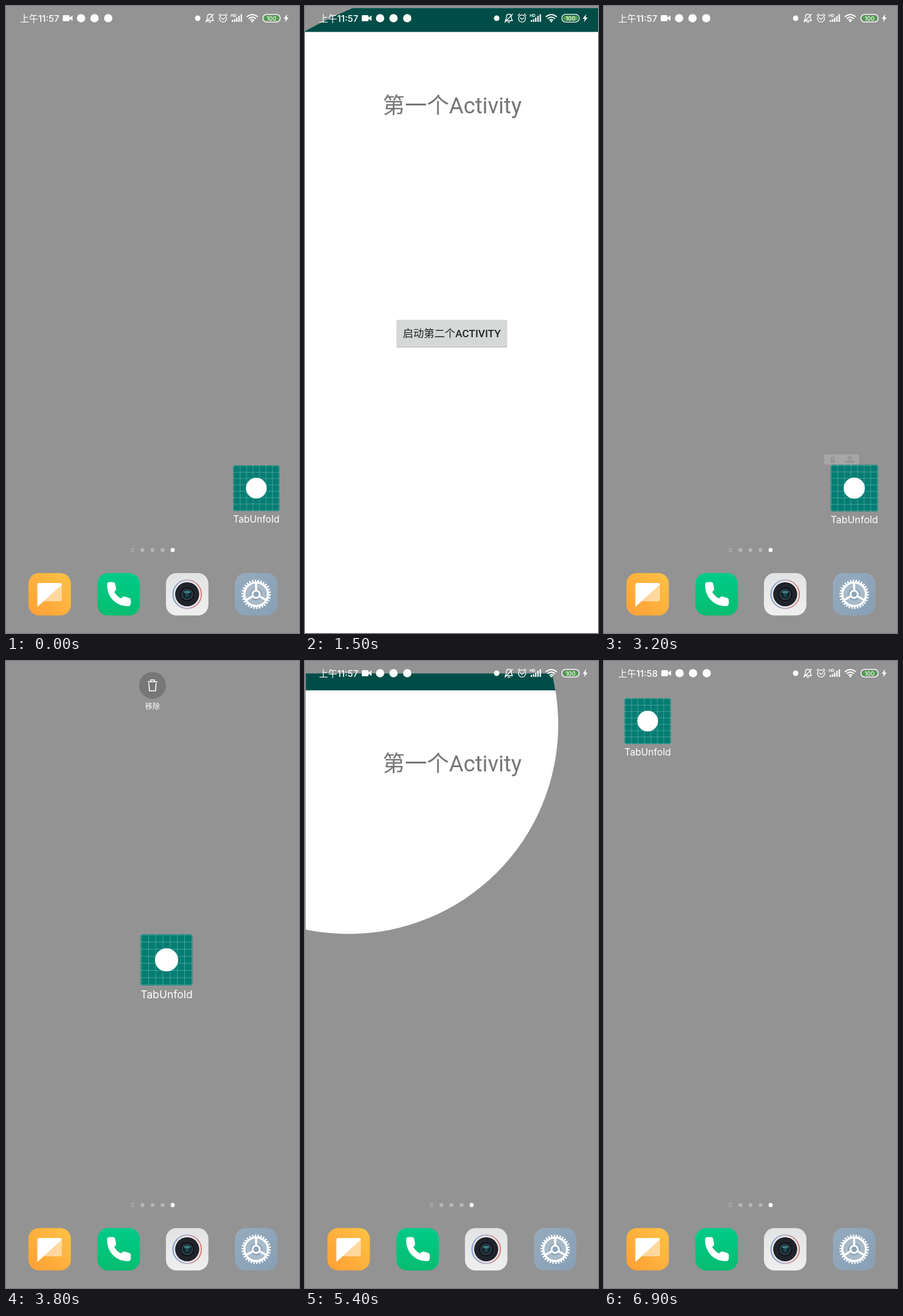
Recreate the animation shown at these times as an HTML page. Size 480 by 1028 pixels, loop 7 s.

```html
<!DOCTYPE html>
<html lang="zh">
<head>
<meta charset="utf-8">
<title>Circular reveal</title>
<style>
  html, body { margin: 0; width: 100%; height: 100%; overflow: hidden; background: #939393; }
  svg { display: block; width: 100%; height: 100%; }
  text { font-family: Inter, "Noto Sans CJK SC", "Noto Sans CJK", sans-serif; }
  .roboto { font-family: Roboto, "Noto Sans CJK SC", "Noto Sans CJK", sans-serif; }
  .line { fill: none; stroke: #fff; stroke-width: 1.3; stroke-linecap: round; stroke-linejoin: round; }
</style>
</head>
<body>
<svg viewBox="0 0 480 1028" preserveAspectRatio="none">
  <defs>
    <linearGradient id="orange" x1="0" y1="1" x2="1" y2="0">
      <stop offset="0" stop-color="#ff9f36"/><stop offset="1" stop-color="#ffc245"/>
    </linearGradient>
    <linearGradient id="green" x1="0" y1="0" x2="0" y2="1">
      <stop offset="0" stop-color="#00cb88"/><stop offset="1" stop-color="#05bd70"/>
    </linearGradient>
    <linearGradient id="silver" x1="0" y1="0" x2="0" y2="1">
      <stop offset="0" stop-color="#e2e3e4"/><stop offset="1" stop-color="#efefee"/>
    </linearGradient>
    <linearGradient id="ring">
      <stop offset="0" stop-color="#6f9bd0"/><stop offset=".5" stop-color="#b9a9c4"/><stop offset="1" stop-color="#d9756a"/>
    </linearGradient>
    <linearGradient id="slate" x1="0" y1="0" x2="1" y2="1">
      <stop offset="0" stop-color="#96abbd"/><stop offset="1" stop-color="#879fb5"/>
    </linearGradient>
    <rect id="tile" x="-34.8" y="-34.8" width="69.6" height="69.6" rx="17.5"/>
    <clipPath id="windowClip"><rect id="windowRect"/></clipPath>
    <clipPath id="discClip"><circle id="disc"/></clipPath>
  </defs>

  <rect width="480" height="1028" fill="#939393"/>

  <!-- page indicator -->
  <path d="M204 889.5h6M204 892h6M204 894.5h6" stroke="#b5b5b5"/>
  <g fill="#b5b5b5">
    <circle cx="223.5" cy="892" r="3.2"/><circle cx="240" cy="892" r="3.2"/><circle cx="256.5" cy="892" r="3.2"/>
    <circle cx="273" cy="892" r="3.4" fill="#fff"/>
  </g>

  <!-- dock -->
  <g transform="translate(71.5 964.5)">
    <use href="#tile" fill="url(#orange)"/>
    <path d="M-20 20.5V-15.500q0-3 3-3H17q3 0 3 3V8.500q0 3-3 3H-10Z" fill="#fff" opacity=".5"/>
    <path d="M-20 20.5V-15.500q0-3 3-3H17q2.500 0 3 2.500Z" fill="#fff"/>
  </g>
  <g transform="translate(184.5 964.5)">
    <use href="#tile" fill="url(#green)"/>
    <path transform="scale(1.05)" d="M-18-15q0-4 4-4h5q3 0 3.700 3l1.300 7q.5 3-3 5.500C-4 1-1 4.500 4 6.500 6 3.500 8 3 11 4l5 1.500q3 1 3 4V14q0 4.500-4.500 4.500C-5 18.500-18 4-18-15Z" fill="#fff"/>
  </g>
  <g transform="translate(296.8 964.5)">
    <use href="#tile" fill="url(#silver)"/>
    <circle r="23.300" fill="#e9e7ea" stroke="url(#ring)" stroke-width="1.800"/>
    <circle r="19.700" fill="#20232a"/>
    <circle r="13" fill="#14171d" stroke="#2b3038"/>
    <circle r="8.500" fill="#10262c" stroke="#4a5663" stroke-width="1.200"/>
    <ellipse cy="-3.500" rx="5" ry="2.400" fill="#3d7b80"/>
    <circle cy="1.500" r="3" fill="#23444d"/>
  </g>
  <g transform="translate(409.8 964.5)">
    <use href="#tile" fill="url(#slate)"/>
    <g fill="none" stroke="#fff">
      <circle r="22.500" stroke-width="3.200" pathLength="60" stroke-dasharray="1 1"/>
      <circle r="19.300" stroke-width="3.600"/>
      <circle r="13.500" stroke="#a9bac9" stroke-width="7"/>
      <circle r="6" stroke-width="3"/>
      <path d="M0-7V-18M6 3.500 15.600 9M-6 3.500-15.600 9" stroke-width="3.500"/>
    </g>
  </g>

  <!-- launcher shortcut, drawn around its centre -->
  <g id="shortcut">
    <rect x="-38" y="-37.500" width="76" height="75" rx="2" fill="#047d73"/>
    <path id="mesh" stroke="#fff" stroke-opacity=".27" stroke-width=".9"/>
    <circle r="17" fill="#fff"/>
    <text y="56" font-size="15.600" fill="#fff" text-anchor="middle">TabUnfold</text>
  </g>

  <g id="menu">
    <rect x="-67" y="-38" width="130" height="38" rx="9" fill="#c4c4c4"/>
    <g fill="none" stroke="#555" stroke-width="1.500">
      <path d="M-39-25l5-6 5 6v6h-10Z"/><circle cx="29" cy="-25" r="6"/><path d="M29-26v4"/>
    </g>
    <g font-size="9" fill="#444" text-anchor="middle">
      <text x="-34" y="-7">移除</text><text x="29" y="-7">应用信息</text>
    </g>
  </g>

  <g id="bin">
    <circle cx="240" cy="40" r="22" fill="#777"/>
    <path d="M232 34h16M237 34v-3h6v3M234 36l1 13h10l1-13" fill="none" stroke="#fff" stroke-width="1.600"/>
    <text x="240" y="79" font-size="12" fill="#fff" text-anchor="middle">移除</text>
  </g>

  <!-- activity window -->
  <g id="activity" clip-path="url(#windowClip)">
    <g id="slide">
      <g clip-path="url(#discClip)">
        <rect width="480" height="1028" fill="#fff"/>
        <rect width="480" height="42" fill="#004d47"/>
        <text class="roboto" x="241" y="175" font-size="36.300" fill="#757575" text-anchor="middle">第一个Activity</text>
        <rect x="149.500" y="515.500" width="182" height="44.500" rx="3" fill="#000" opacity=".1"/>
        <rect x="150" y="515" width="181" height="44" rx="2" fill="#000" opacity=".18"/>
        <rect x="150" y="514" width="181" height="44" rx="2" fill="#d6d7d7"/>
        <text class="roboto" x="240.500" y="542" font-size="17.200" font-weight="500" fill="#1d2423" text-anchor="middle">启动第二个<tspan>ACTIVITY</tspan></text>
      </g>
    </g>
  </g>

  <!-- status bar -->
  <g id="status" fill="#fff">
    <text id="clock" x="23" y="25.500" font-size="14.900" font-weight="500">上午11:57</text>
    <g id="notices">
      <rect x="93" y="15" width="11" height="10" rx="1.500"/><path d="M104 19l5-3.500v9l-5-3.500Z"/>
      <circle cx="123" cy="20" r="6.800"/><circle cx="145" cy="20" r="6.800"/><circle cx="167.500" cy="20" r="6.800"/>
    </g>
    <circle cx="314" cy="20" r="4.500"/>
    <g class="line">
      <path d="M328 24h12c-2-2-2-3-2-6 0-6-8-6-8 0 0 3 0 4-2 6ZM332.500 26.500h3M327.500 26.500 340 13.500"/>
      <circle cx="355.500" cy="20.500" r="5.800"/>
      <path d="M352.500 19.500l3 2.500 3-2.500M349 15.500l2.500-2.500M362 15.500l-2.500-2.500"/>
      <path d="M395 17.500q8.500-7 17 0M398 20.500q5.500-4.500 11 0M401 23.300q2.500-2 5 0" stroke-width="1.800"/>
    </g>
    <circle cx="403.500" cy="25.300" r="1.500"/>
    <text x="368" y="17.500" font-size="6.500" font-weight="700">HD</text>
    <path d="M371 26v-3M374.500 26v-4.500M378 26v-7M381.700 26V16M385.500 26V13.500" stroke="#fff" stroke-width="2.200"/>
    <rect x="420.700" y="13.700" width="28.600" height="12.600" rx="6.300" fill="none" stroke="#fff" stroke-width="1.300"/>
    <rect x="422.700" y="15.700" width="24.600" height="8.600" rx="4.300" fill="#4f9b4c"/>
    <text x="435" y="23.500" font-size="9.500" font-weight="500" text-anchor="middle">100</text>
    <path d="M460.500 13.500 455 21h3.300l-1.300 5.500 6-7.500h-3.300Z"/>
  </g>
</svg>
<script>
const LOOP = 7000, STEP = 100, WIDTH = 480, HEIGHT = 1028;
const $ = id => document.getElementById(id);
const clamp = v => Math.min(1, Math.max(0, v));
const ease = u => (1 - Math.cos(Math.PI * clamp(u))) / 2;
const set = (id, attrs) => {
  for (const name in attrs) $(id).setAttribute(name, attrs[name]);
};

const launches = [
  { open: 977, close: 1832, x: 410, y: 790.5 },
  { open: 5163, close: 6019, x: 71.5, y: 98 }
];
const REVEAL = 600, GROW = 560;

// Rows: time, then the values reached at that time.
const dragPath = [
  [3450, 410, 790.5], [3650, 350, 670], [3900, 205, 370], [4200, 62, 112], [4400, 71.5, 98.5]
];
const liftScale = [[3100, 1], [3200, 1.02], [3450, 1.06], [3600, 1.12], [4250, 1.12], [4400, 1]];
const menuPose = [[3100, .2, 0], [3200, .445, .4], [3300, 1, .95], [3450, 1, .95], [3550, .6, 0]];
const binAlpha = [[3450, 0], [3600, 1], [4250, 1], [4500, .03], [4550, 0]];
const statusAlpha = [[3450, 1], [3600, 0], [4250, 0], [4400, 1]];

function sample(rows, t) {
  const next = rows.findIndex(row => row[0] > t);
  if (next === 0) return rows[0].slice(1);
  if (next < 0) return rows[rows.length - 1].slice(1);
  const a = rows[next - 1], b = rows[next];
  const u = (t - a[0]) / (b[0] - a[0]);
  return a.slice(1).map((v, i) => v + (b[i + 1] - v) * u);
}

function drawActivity(t) {
  const run = launches.find(l => t > l.open && t < l.close + REVEAL);
  $('activity').style.display = run ? '' : 'none';
  if (!run) return;
  const { open, close, x, y } = run;
  const reach = Math.hypot(Math.max(x, WIDTH - x), Math.max(y, HEIGHT - y));
  const shown = t < close ? ease((t - open) / REVEAL) : 1 - ease((t - close) / REVEAL);
  set('disc', { cx: x, cy: y, r: reach * shown });

  // The window grows out of the shortcut's box while it slides up.
  const rest = 1 - clamp((t - open) / GROW);
  const restX = rest ** 6, restY = rest ** 2;
  const left = (x - 38) * restX, right = WIDTH - (WIDTH - x - 38) * restX;
  const top = (y - 37.5) * restY, bottom = HEIGHT - (HEIGHT - y - 37.5) * restY;
  set('windowRect', { x: left, y: top, width: right - left, height: bottom - top });
  const shift = (9.8 + (y - 37.5) / 7) * restY;
  set('slide', { transform: `translate(0 ${shift})` });
}

function draw(t) {
  const [x, y] = sample(dragPath, t);
  set('shortcut', { transform: `translate(${x} ${y}) scale(${sample(liftScale, t)[0]})` });

  const [scale, alpha] = sample(menuPose, t);
  set('menu', { transform: `translate(390 752) scale(${scale})`, opacity: alpha });
  set('bin', { opacity: sample(binAlpha, t)[0] });
  set('status', { opacity: sample(statusAlpha, t)[0] });

  const late = t >= 6000;
  $('clock').textContent = late ? '上午11:58' : '上午11:57';
  set('notices', { transform: `translate(${late ? 0.8 : 0} 0)` });
  drawActivity(t);
}

let mesh = '';
for (let i = 0; i < 8; i++) {
  const u = (1 + 10 * i) / 72 - 0.5;
  mesh += `M${76 * u}-37.5V37.5M-38 ${75 * u}H38`;
}
set('mesh', { d: mesh });

const start = performance.now();
function tick(now) {
  const t = Math.max(0, now - start) % LOOP;
  draw(Math.floor(t / STEP) * STEP);
  requestAnimationFrame(tick);
}
draw(0);
requestAnimationFrame(tick);
</script>
</body>
</html>
```
